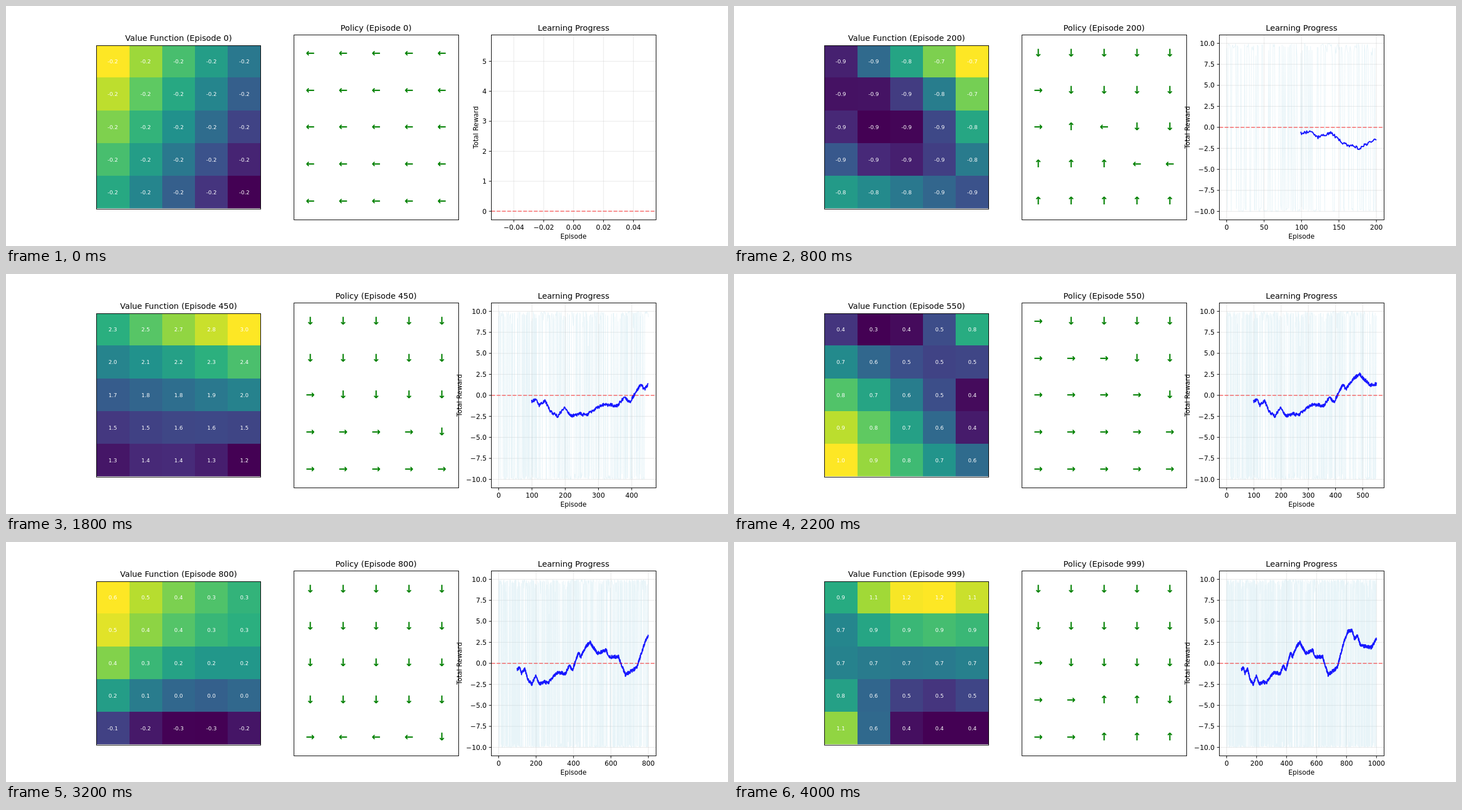
Recreate the animation shown at these times as an HTML page with a canvas. Size 1280 by 427 pixels, loop 4.2 s.

```html
<!DOCTYPE html>
<html lang="en">
<head>
<meta charset="utf-8">
<title>Grid world learning</title>
<style>
html, body { margin: 0; width: 100%; height: 100%; overflow: hidden; background: #fff; }
canvas { display: block; }
</style>
</head>
<body>
<canvas id="stage" width="1280" height="427"></canvas>
<script>
const ctx = document.getElementById('stage').getContext('2d');
const STEP = 200, STEPS = 21;
const FONT = '"DejaVu Sans", Verdana, sans-serif';
const VIRIDIS = ['440154', '472d7b', '3b528b', '2c728e', '21918c', '28ae80', '5ec962', 'addc30', 'fde725']
  .map(h => [0, 2, 4].map(i => parseInt(h.slice(i, i + 2), 16)));

// Stages of learning: value range, a 3x3 net of levels (percent) that
// shapes the value surface, and the policy.
const STAGES = [
  { at: 0, lo: -0.204, hi: -0.196, net: [100, 70, 40, 80, 50, 20, 60, 30, 0],
    policy: '←'.repeat(25) },
  { at: 4, lo: -0.949, hi: -0.689, net: [9, 58, 100, 11, 1, 59, 54, 40, 25],
    policy: '↓↓↓↓↓→↓↓↓↓→↑←↓↓↑↑↑←←↑↑↑↑↑' },
  { at: 9, lo: 1.17, hi: 2.97, net: [63, 83, 100, 29, 36, 44, 6, 12, 0],
    policy: '↓'.repeat(10) + '→↓↓↓↓→→→→↓→→→→→' },
  { at: 11, lo: 0.31, hi: 1.01, net: [18, 6, 63, 73, 44, 6, 100, 69, 37],
    policy: '→↓↓↓↓→→→↓↓→→→→↓' + '→'.repeat(10) },
  { at: 14, lo: 0.42, hi: 3.32, net: [100, 73, 43, 86, 57, 31, 41, 15, 0],
    policy: '↓'.repeat(25) },
  { at: 17, lo: -0.956, hi: -0.376, net: [29, 52, 95, 22, 43, 98, 0, 24, 73],
    policy: '↓'.repeat(20) + '→←←←↓' },
  { at: 20, lo: 0.36, hi: 1.2, net: [61, 99, 92, 44, 40, 43, 83, 4, 0],
    policy: '↓'.repeat(10) + '→↓↓↓↓→→↑↑↓→→↑↑↑' }
];

// Main turning points of the running mean: [episode, reward].
const TURNS = [[99, -.7], [112, -.55], [121, -1.2], [140, -.65], [156, -1.9], [176, -2.5],
  [198, -1.5], [220, -2.5], [242, -2.15], [262, -2.4], [311, -1.1], [358, -1.2], [379, -.1],
  [393, -.9], [428, 1.4], [437, .7], [470, 2.1], [488, 2.5], [528, 1.2], [574, 1.6],
  [592, .75], [640, .8], [677, -1.35], [738, -.5], [783, 2.6], [809, 3.8], [838, 3.9],
  [853, 2.9], [872, 3.3], [894, 2.1], [966, 1.9], [999, 2.9]];

const mix = (a, b, f) => a + (b - a) * f;
const clamp = (v, lo, hi) => Math.min(Math.max(v, lo), hi);

function seeded(seed) {
  return () => {
    seed = (seed + 0x6D2B79F5) | 0;
    let t = Math.imul(seed ^ (seed >>> 15), 1 | seed);
    t = (t + Math.imul(t ^ (t >>> 7), 61 | t)) ^ t;
    return ((t ^ (t >>> 14)) >>> 0) / 4294967296;
  };
}

// Rewards come in short runs of wins and losses.
const rand = seeded(17);
let win = true;
const rewards = Array.from({ length: 1000 }, (_, e) => {
  if (e && rand() < 0.4) win = !win;
  const steps = -Math.log(1 - rand());
  return win ? Math.max(5, 10 - steps * 0.5) : Math.min(-8, -10 + steps * 0.15);
});

const mean = [];
TURNS.slice(1).forEach(([e1, v1], i) => {
  const [e0, v0] = TURNS[i];
  for (let e = e0; e <= e1; e++) mean[e] = mix(v0, v1, (e - e0) / (e1 - e0)) + (rand() - 0.5) * 0.4;
});

function viridis(level) {
  const p = clamp(level, 0, 1) * 8, i = Math.min(Math.floor(p), 7);
  return `rgb(${VIRIDIS[i].map((c, k) => Math.round(mix(c, VIRIDIS[i + 1][k], p - i)))})`;
}

function label(str, x, y, size, color = '#000', align = 'center', weight = '') {
  ctx.font = `${weight} ${size}px ${FONT}`;
  ctx.textAlign = align;
  ctx.fillStyle = color;
  ctx.fillText(str, x, y);
}

function path(points, color, width) {
  ctx.beginPath();
  for (const [x, y] of points) ctx.lineTo(x, y);
  ctx.strokeStyle = color;
  ctx.lineWidth = width;
  ctx.stroke();
}

function frame(x, y, w, h) {
  ctx.strokeStyle = '#000';
  ctx.lineWidth = 1;
  ctx.strokeRect(x, y, w, h);
}

// Parabola through a, b, c at 0, 1, 2.
const bend = (a, b, c, t) => a * (t - 1) * (t - 2) / 2 + b * t * (2 - t) + c * t * (t - 1) / 2;

function valueAt({ net, lo, hi }, cell) {
  const x = cell % 5 / 2, y = Math.floor(cell / 5) / 2;
  const rows = [0, 3, 6].map(k => bend(net[k], net[k + 1], net[k + 2], x));
  return mix(lo, hi, clamp(bend(...rows, y) / 100, 0, 1));
}

function snapshot(step) {
  let i = 0;
  while (i < STAGES.length - 2 && STAGES[i + 1].at <= step) i++;
  const a = STAGES[i], b = STAGES[i + 1], f = (step - a.at) / (b.at - a.at);
  return {
    values: Array.from({ length: 25 }, (_, c) => mix(valueAt(a, c), valueAt(b, c), f)),
    policy: f < 0.5 ? a.policy : b.policy
  };
}

function drawValues(values, episode) {
  const lo = Math.min(...values), hi = Math.max(...values);
  const edgeX = c => Math.round(160.6 + 58.2 * c);
  const edgeY = r => Math.max(70, Math.round(69.2 + 58.2 * r));
  values.forEach((v, i) => {
    const c = i % 5, r = Math.floor(i / 5), x = edgeX(c), y = edgeY(r);
    ctx.fillStyle = viridis((v - lo) / (hi - lo));
    ctx.fillRect(x, y, edgeX(c + 1) - x, edgeY(r + 1) - y);
    const str = v.toFixed(1).replace('-0.0', '0.0');
    label(str, 189.2 + 58.35 * c, 102.1 + 58.25 * r, 9.48, '#fff');
  });
  frame(160.5, 70.5, 291, 291);
  label(`Value Function (Episode ${episode})`, 305.9, 62, 14.22);
}

function drawPolicy(policy, episode) {
  [...policy].forEach((arrow, i) => {
    label(arrow, 539.4 + 58.35 * (i % 5), 89.8 + 65.8 * Math.floor(i / 5), 18.96,
      '#008000', 'center', 'bold');
  });
  frame(510.5, 51.5, 292, 329);
  label(`Policy (Episode ${episode})`, 656, 44.2, 14.22);
}

// Smallest round tick step that leaves at most eight intervals.
function tickStep(span) {
  const raw = span / 8, unit = 10 ** Math.floor(Math.log10(raw));
  return [1, 2, 2.5, 5, 10].map(m => m * unit).find(s => s >= raw);
}

function axisTicks(episode) {
  const range = (from, to, by) =>
    Array.from({ length: Math.round((to - from) / by) + 1 }, (_, i) => from + i * by);
  if (!episode) return { xt: range(-0.04, 0.04, 0.02), yt: range(0, 5, 1), xd: 2, yd: 0 };
  const by = tickStep(episode * 1.1);
  return { xt: range(0, Math.floor(episode * 1.05 / by) * by, by), yt: range(-10, 10, 2.5), xd: 0, yd: 1 };
}

function drawProgress(episode) {
  const left = 860.5, right = 1152.5, top = 51.5, bottom = 380.5;
  const px = episode ? e => 873.5 + 265.3 * e / episode : e => 1006.3 + 2650 * e;
  const py = episode ? v => 215.9 - 14.95 * v : v => 365.2 - 53.36 * v;
  const { xt, yt, xd, yd } = axisTicks(episode);
  const number = (v, d) => (Math.abs(v) < 1e-9 ? 0 : v).toFixed(d).replace('-', '\u2212');

  for (const v of xt) path([[px(v), top], [px(v), bottom]], 'rgba(176,176,176,.3)', 1);
  for (const v of yt) path([[left, py(v)], [right, py(v)]], 'rgba(176,176,176,.3)', 1);

  ctx.lineJoin = 'bevel';
  if (episode) {
    // Wider than one pixel, so that overlapping strokes do not add up.
    const seen = rewards.slice(0, episode + 1).map((v, e) => [px(e), py(v)]);
    path(seen, 'rgba(173,216,230,.28)', 1.02);
  }
  ctx.lineJoin = 'round';
  if (episode >= 100) {
    const line = mean.slice(99, episode + 1).map((v, i) => [px(99 + i), py(v)]);
    path(line, 'rgba(0,0,255,.9)', 2.1);
  }
  ctx.lineJoin = 'miter';
  ctx.setLineDash([6.58, 2.84]);
  path([[left, py(0)], [right, py(0)]], 'rgba(255,0,0,.5)', 1.78);
  ctx.setLineDash([]);

  for (const v of xt) {
    path([[px(v), bottom], [px(v), bottom + 4.2]], '#000', 1);
    label(number(v, xd), px(v), 398, 11.85);
  }
  for (const v of yt) {
    path([[left - 4.2, py(v)], [left, py(v)]], '#000', 1);
    label(number(v, yd), 852, py(v) + 4.3, 11.85, '#000', 'right');
  }
  frame(left, top, right - left, bottom - top);
  label('Learning Progress', 1006.2, 44.2, 14.22);
  label('Episode', 1006, 414, 11.85);

  ctx.save();
  ctx.translate(episode ? 808 : 836.8, 216);
  ctx.rotate(-Math.PI / 2);
  label('Total Reward', 0, 0, 11.85);
  ctx.restore();
}

function draw(step) {
  const episode = Math.min(step * 50, 999);
  const { values, policy } = snapshot(step);
  ctx.fillStyle = '#fff';
  ctx.fillRect(0, 0, 1280, 427);
  drawValues(values, episode);
  drawPolicy(policy, episode);
  drawProgress(episode);
}

const start = performance.now();
let shown = -1;
function tick() {
  const step = Math.floor((performance.now() - start) / STEP) % STEPS;
  if (step !== shown) draw(shown = step);
  requestAnimationFrame(tick);
}
tick();
</script>
</body>
</html>
```
